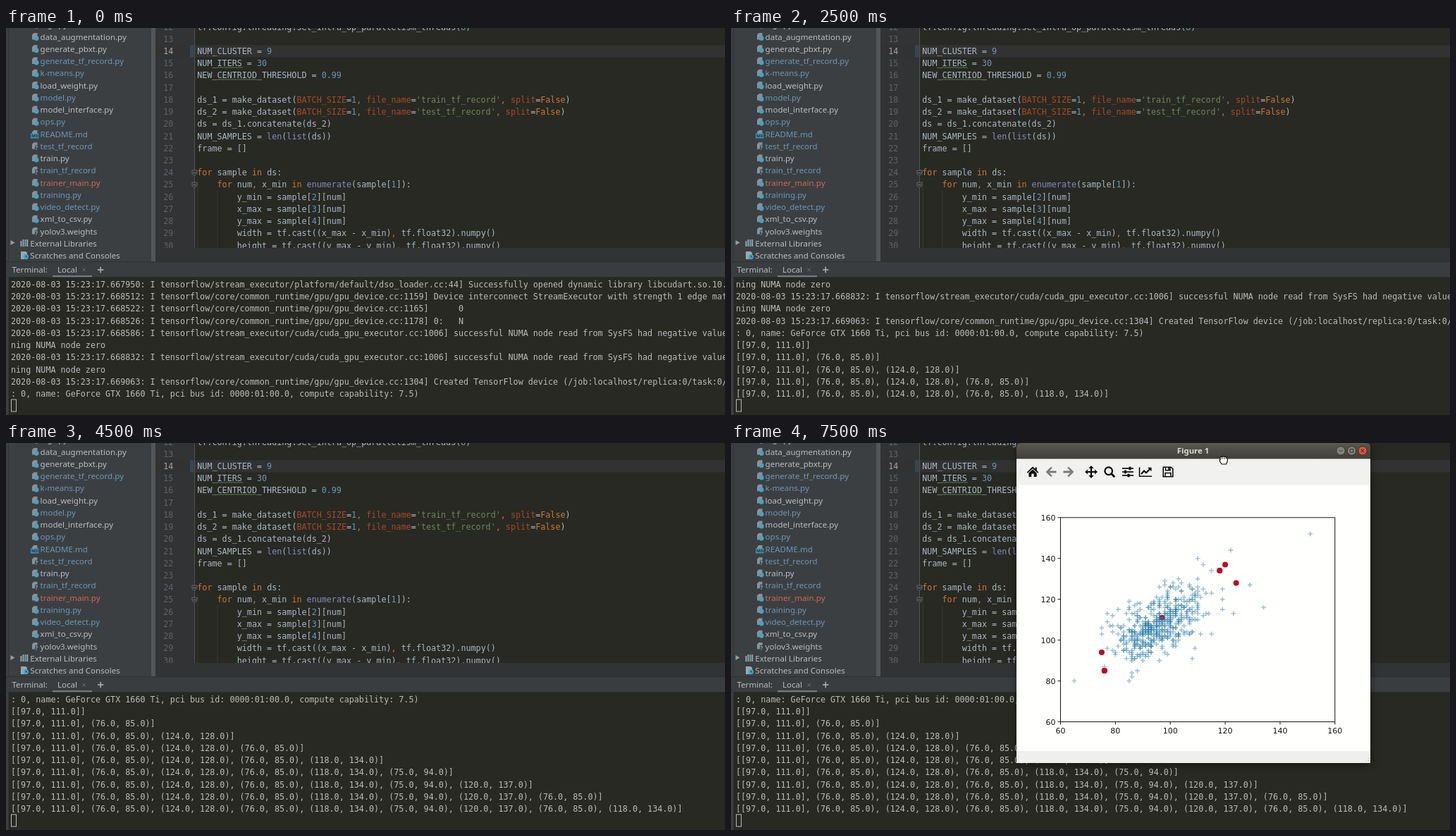
Recreate the animation shown at these times as an HTML page. Size 1020x549 px, loop 8 s.

```html
<!DOCTYPE html>
<html lang="en">
<head>
<meta charset="utf-8">
<title>Clustering run</title>
<style>
html, body { margin: 0; width: 100%; height: 100%; overflow: hidden; background: #282923; }
svg { display: block; width: 1020px; height: 549px; }
text { white-space: pre; }
.mono { font: 11.73px "DejaVu Sans Mono", monospace; }
.ui { font: 11.55px "Noto Sans", "Open Sans", sans-serif; }
.tick { font: 11px "DejaVu Sans", sans-serif; fill: #111; }
.title { font: bold 11.4px "Noto Sans", "Open Sans", sans-serif; fill: #dfdbd2; }
</style>
</head>
<body>
<svg id="stage" viewBox="0 0 1020 549" xmlns="http://www.w3.org/2000/svg">
  <defs>
    <clipPath id="editorClip"><rect x="212" y="0" width="808" height="312"/></clipPath>
    <linearGradient id="bar" x2="0" y2="1">
      <stop offset="0" stop-color="#5a584f"/><stop offset="1" stop-color="#3e3d38"/>
    </linearGradient>
    <filter id="blur" x="-10%" y="-10%" width="120%" height="120%"><feGaussianBlur stdDeviation="6"/></filter>
  </defs>
</svg>
<script>
const stage = document.getElementById('stage');
const PITCH = 17.22;

function el(parent, tag, attrs = {}, text) {
  const node = document.createElementNS('http://www.w3.org/2000/svg', tag);
  for (const key in attrs) node.setAttribute(key, attrs[key]);
  if (text !== undefined) node.textContent = text;
  parent.appendChild(node);
  return node;
}
const group = (parent, attrs) => el(parent, 'g', attrs);
const rect = (p, x, y, width, height, fill, more) => el(p, 'rect', { x, y, width, height, fill, ...more });
const path = (p, d, fill, more) => el(p, 'path', { d, fill, ...more });
const line = (p, d, stroke, w = 1, more) => path(p, d, 'none', { stroke, 'stroke-width': w, ...more });
const circle = (p, cx, cy, r, fill, more) => el(p, 'circle', { cx, cy, r, fill, ...more });
const label = (p, cls, x, y, fill, text, more) => el(p, 'text', { class: cls, x, y, fill, ...more }, text);

function drawSidebar() {
  const g = group(stage);
  rect(g, 0, 0, 212, 332, '#3c3f41');
  rect(g, 3, 0, 1, 332, '#313335');
  rect(g, 206, 0, 6, 332, '#535657');
  const tones = { n: '#bbbbbb', b: '#6897bb', r: '#d1675a' };
  const files = `n logs.py
n data_augmentation.py
n generate_pbxt.py
b generate_tf_record.py
b k-means.py
n load_weight.py
b model.py
n model_interface.py
b ops.py
b README.md
b test_tf_record
n train.py
b train_tf_record
r trainer_main.py
b training.py
b video_detect.py
n xml_to_csv.py
n yolov3.weights`.split('\n');
  files.forEach((entry, i) => {
    const name = entry.slice(2), y = -4.7 + i * 17.25;
    fileIcon(g, name, y);
    label(g, 'ui', 48.6, y + 4.1, tones[entry[0]], name);
  });

  path(g, 'M6.5 301 L12.5 304.5 L6.5 308 Z', '#9a9da0');
  [20.5, 23.5, 26.5, 29.3].forEach((x, i) =>
    rect(g, x, i ? 300 : 302, 1.9, i ? 10 : 8, i === 2 ? '#62a9bd' : '#9aa7b0'));
  label(g, 'ui', 34.3, 309.8, '#bbbbbb', 'External Libraries');
  path(g, 'M21 317 h7 l2 2 v4 h-4 v5 h-5 Z', '#9aa7b0');
  circle(g, 28.3, 324.6, 3.7, '#40a5cc');
  line(g, 'M28.3 322.5 v2.3 h1.8', '#2f3a40');
  label(g, 'ui', 34.3, 327.1, '#bbbbbb', 'Scratches and Consoles');
}

function fileIcon(g, name, y) {
  path(g, `M39.5 ${y - 5.5} h5 v9.5 h-7.5 v-7 Z`, '#87929a');
  if (name.endsWith('.py')) {
    circle(g, 43.2, y + 2, 3.4, '#4aa0c4');
  } else if (name.endsWith('.md')) {
    rect(g, 35, y - 1, 11.5, 7, '#3f91b5');
    label(g, 'ui', 36, y + 4.8, '#263238', 'MD', { style: 'font-size:6px;font-weight:bold' });
  } else {
    rect(g, 41, y - 1.5, 5.5, 7.5, '#3c3f41');
    label(g, 'ui', 41, y + 5.3, '#56b3d8', '?', { style: 'font-size:9px;font-weight:bold' });
  }
}

const KEYWORDS = /^(for|in|False)$/;
const BUILTINS = /^(len|list|enumerate)$/;
const KWARGS = /^(BATCH_SIZE|file_name|split)$/;

function tokenTone(token) {
  if (token[0] === "'") return '#6a8759';
  if (/^\d/.test(token)) return '#6897bb';
  if (token === ',' || KEYWORDS.test(token)) return '#cc7832';
  if (BUILTINS.test(token)) return '#8888c6';
  if (KWARGS.test(token)) return '#aa4926';
  return '#a9b7c6';
}

function squiggle(g, x, y, w) {
  let d = `M${x} ${y}`;
  for (let i = 0; i < w / 4; i++) d += ' l2 -2 l2 2';
  line(g, d, '#5f9465', 0.9);
}

function drawEditor() {
  const g = group(stage, { 'clip-path': 'url(#editorClip)' });
  rect(g, 212, 0, 808, 312, '#282923');
  rect(g, 212, 0, 55, 312, '#313335');
  rect(g, 212, 24.3, 808, 17.2, '#323232');
  rect(g, 261, 24.3, 5.5, 17.2, '#374752');
  line(g, 'M267.5 0 V312', '#55585a', 0.9);
  line(g, 'M272 214 V312 M300 231 V312', '#393a36');
  const code = `tf.config.threading.set_intra_op_parallelism_threads(8)

NUM_CLUSTER = 9
NUM_ITERS = 30
NEW_CENTRIOD_THRESHOLD = 0.99

ds_1 = make_dataset(BATCH_SIZE=1, file_name='train_tf_record', split=False)
ds_2 = make_dataset(BATCH_SIZE=1, file_name='test_tf_record', split=False)
ds = ds_1.concatenate(ds_2)
NUM_SAMPLES = len(list(ds))
frame = []

for sample in ds:
    for num, x_min in enumerate(sample[1]):
        y_min = sample[2][num]
        x_max = sample[3][num]
        y_max = sample[4][num]
        width = tf.cast((x_max - x_min), tf.float32).numpy()
        height = tf.cast((y_max - y_min), tf.float32).numpy()`.split('\n');
  code.forEach((src, i) => {
    const y = 2.6 + i * PITCH, no = 12 + i;
    label(g, 'mono', 237.3, y, no === 14 ? '#a4a3a3' : '#606366', no, { 'text-anchor': 'end' });
    const row = label(g, 'mono', 271.3, y, '#a9b7c6');
    for (const token of src.match(/'[^']*'|\d+(\.\d+)?|\w+|\s+|./g) || [])
      el(row, 'tspan', { fill: tokenTone(token) }, token);
  });
  squiggle(g, 299.5, 57, 35);
  squiggle(g, 299.5, 74, 56);
  for (const y of [205.5, 222.7]) {
    path(g, `M264 ${y - 3.5} h7 v4.5 l-3.5 3 l-3.5 -3 Z`, '#313335', { stroke: '#6b6e70', 'stroke-width': 0.9 });
    line(g, `M265.5 ${y} h4`, '#8a8d8f', 0.9);
  }
  rect(stage, 212, 312, 808, 20, '#313335');
}

function drawTerminalFrame() {
  const g = group(stage);
  rect(g, 0, 331, 1020, 22.5, '#3a3d3f');
  rect(g, 0, 331, 1020, 1, '#2d2f30');
  rect(g, 66, 351, 56, 2.6, '#747a80');
  label(g, 'ui', 8.5, 347, '#bbbbbb', 'Terminal:');
  label(g, 'ui', 73, 347, '#bbbbbb', 'Local');
  line(g, 'M108.3 340.8 l4.6 4.6 m0 -4.6 l-4.6 4.6', '#74777a', 0.9);
  line(g, 'M130 343 h8.4 m-4.2 -4.2 v8.4', '#b5b8ba', 1.4);
  rect(g, 0, 353.5, 1020, 196, '#282923');
  rect(g, 0, 353.5, 3.5, 196, '#3c3f41');
  rect(g, 7.5, 527, 7, 17, 'none', { stroke: '#bbbbbb' });
}

const stamp = (us, src, msg) => `2020-08-03 15:23:17.${us}: I tensorflow/${src}] ${msg}`;
const GPU = 'core/common_runtime/gpu/gpu_device.cc:';
const NUMA = 'successful NUMA node read from SysFS had negative value (-1)';
const CUDA = 'stream_executor/cuda/cuda_gpu_executor.cc:1006';
const centres = [[97, 111], [76, 85], [124, 128], [76, 85], [118, 134], [75, 94], [120, 137], [76, 85], [118, 134]];
const pairs = centres.map(c => c.map(v => v.toFixed(1)).join(', '));
const log = [
  stamp(667950, 'stream_executor/platform/default/dso_loader.cc:44', 'Successfully opened dynamic library libcudart.so.10.1'),
  stamp(668512, GPU + 1159, 'Device interconnect StreamExecutor with strength 1 edge matrix:'),
  stamp(668522, GPU + 1165, '     0'),
  stamp(668526, GPU + 1178, '0:   N'),
  stamp(668586, CUDA, NUMA),
  'ning NUMA node zero',
  stamp(668832, CUDA, NUMA),
  'ning NUMA node zero',
  stamp(669063, GPU + 1304, 'Created TensorFlow device (/job:localhost/replica:0/task:0/device'),
  ': 0, name: GeForce GTX 1660 Ti, pci bus id: 0000:01:00.0, compute capability: 7.5)',
  ...pairs.map((_, i) => '[' + pairs.slice(0, i + 1).map((p, k) => k ? `(${p})` : `[${p}]`).join(', ') + ']')
];

function random(seed) {
  return () => {
    seed = (seed + 0x6D2B79F5) | 0;
    let t = Math.imul(seed ^ (seed >>> 15), 1 | seed);
    t = (t + Math.imul(t ^ (t >>> 7), 61 | t)) ^ t;
    return ((t ^ (t >>> 14)) >>> 0) / 4294967296;
  };
}

function samples() {
  const rnd = random(11);
  const gauss = () => Math.sqrt(-2 * Math.log(1 - rnd())) * Math.cos(2 * Math.PI * rnd());
  const points = [
    [151, 152], [122, 144], [110, 140], [112, 137], [115, 134], [103, 130], [110, 130], [98, 129],
    [119, 125], [129, 127], [134, 116], [123, 113], [119, 120], [119, 115], [115, 123], [115, 103],
    [109, 96], [85, 119], [85, 80], [86, 82], [86, 84], [88, 85], [75, 106], [75, 103], [76, 87], [65, 80]
  ];
  while (points.length < 490) {
    const x = Math.round(95.5 + 8.3 * gauss());
    const y = Math.round(107.5 + 0.7 * (x - 95.5) + 7.8 * gauss());
    if (x > 76 && x < 115 && y > 89 && y < 129) points.push([x, y]);
  }
  return points;
}

// Window coordinates: origin at its top left corner.
function drawFigure() {
  const g = group(stage);
  rect(g, 0, 4, 502, 452, '#000', { opacity: 0.5, filter: 'url(#blur)' });
  path(g, 'M0 24 V6 Q0 0 6 0 H496 Q502 0 502 6 V24 Z', 'url(#bar)');
  label(g, 'title', 250.5, 15.2, '#dfdbd2', 'Figure 1', { 'text-anchor': 'middle' });
  circle(g, 460, 11, 6.2, '#85837a', { stroke: '#33322e' });
  circle(g, 475.5, 11, 6.2, '#85837a', { stroke: '#33322e' });
  circle(g, 491, 11, 6.2, '#e5552d', { stroke: '#33322e' });
  line(g, 'M457.5 11 h5 M473.2 8.8 h4.6 v4.4 h-4.6 Z M488.9 8.9 l4.2 4.2 m0 -4.2 l-4.2 4.2', '#35332e', 1.1);

  rect(g, 0, 22.5, 502, 37.5, '#f1f1f0');
  rect(g, 0, 59.5, 502, 377.5, '#fffffd');
  rect(g, 0, 437, 502, 17, '#efefed');
  line(g, 'M5.5 36 v12', '#b9b9b7', 1, { 'stroke-dasharray': '1 2' });
  line(g, 'M496 450.5 h1 m2 0 h1 m-1 -3 h1', '#b0b0ae');
  drawTools(g);
  drawPlot(g);
  return g;
}

function drawTools(g) {
  const at = x => group(g, { transform: `translate(${x} 41)` });
  path(at(23), 'M0 -7.5 L3.5 -4.2 V-6.5 H5.8 V-2 L8.3 .6 L7.3 1.7 L0 -4.8 L-7.3 1.7 L-8.3 .6 Z M-5.6 1.6 L0 -3.4 L5.6 1.6 V7 H1.7 V2.6 H-1.7 V7 H-5.6 Z', '#0c0c0c');
  const arrow = 'M-7.5 0 L0 -7.3 L1.8 -5.5 L-2.3 -1.4 H7.5 V1.4 H-2.3 L1.8 5.5 L0 7.3 Z';
  path(at(49), arrow, '#7b7b7b');
  path(group(at(74), { transform: 'scale(-1 1)' }), arrow, '#7b7b7b');
  const move = at(106);
  line(move, 'M-7 0 H7 M0 -7 V7', '#0c0c0c', 2.2);
  for (const a of [0, 90, 180, 270])
    path(move, 'M0 -9 L3.6 -5 H-3.6 Z', '#0c0c0c', { transform: `rotate(${a})` });
  const zoom = at(132);
  circle(zoom, -1.3, -1.3, 5.3, 'none', { stroke: '#0c0c0c', 'stroke-width': 2.3 });
  line(zoom, 'M2.8 2.8 L7.2 7.2', '#0c0c0c', 3);
  const sliders = at(158);
  [[-5, 3], [0, -3.5], [5, 1]].forEach(([y, x]) => {
    line(sliders, `M-8 ${y} H8`, '#0c0c0c', 1.7);
    rect(sliders, x - 1.5, y - 2.3, 3, 4.6, '#0c0c0c');
  });
  const chart = at(183);
  line(chart, 'M-8.5 -6.5 V6.2 H9', '#0c0c0c', 1.6);
  line(chart, 'M-6 3 L-2 -1.5 L1 1.3 L6.5 -4.2', '#0c0c0c', 2.2);
  path(chart, 'M3 -6.2 H8.5 V-.7 Z', '#0c0c0c');
  const save = at(215);
  line(save, 'M-6.8 -6.8 H4.2 L6.8 -4.2 V6.8 H-6.8 Z', '#0c0c0c', 1.6);
  line(save, 'M-3.5 -6.5 V-2.2 H3 V-6.5 M-4 6.5 V1.6 H4 V6.5', '#0c0c0c', 1.5);
  rect(save, 0.3, -6, 1.8, 3, '#0c0c0c');
}

function drawPlot(g) {
  const px = v => 62.5 + (v - 60) * 3.893;
  const py = v => 395.5 - (v - 60) * 2.897;
  for (const [x, y] of centres) circle(g, px(x), py(y), 4, '#bd0a22');
  const marks = group(g, { stroke: '#2b7ca8', 'stroke-opacity': 0.45, 'stroke-width': 1.6 });
  for (const [x, y] of samples())
    path(marks, `M${px(x) - 3.3} ${py(y)} h6.6 m-3.3 -3.3 v6.6`, 'none');
  rect(g, 62.5, py(160), 389.3, 289.7, 'none', { stroke: '#151515' });
  for (let v = 60; v <= 160; v += 20) {
    line(g, `M${px(v)} 395.5 v4 M62.5 ${py(v)} h-4`, '#151515');
    label(g, 'tick', px(v), 412, '#111', v, { 'text-anchor': 'middle' });
    label(g, 'tick', 55.5, py(v) + 4.2, '#111', v, { 'text-anchor': 'end' });
  }
}

function drawHand() {
  const g = group(stage, { transform: 'translate(699 25)' });
  path(g, 'M-5 -4 Q-4 -6.5 -2.3 -5 Q-1 -7 .6 -5.2 Q2.2 -6.5 3.3 -4.5 Q5.6 -4.8 5.4 -2 L5 1.5 L3.6 5 H-3 L-5.4 1 Q-6.6 -1.5 -4.8 -1.3 Z',
    '#fff', { stroke: '#111', 'stroke-width': 1.2 });
  line(g, 'M-2.3 -4.5 V-2 M.6 -4.5 V-2 M3.2 -4 V-2', '#111', 0.9);
  return g;
}

drawSidebar();
drawEditor();
drawTerminalFrame();
const rows = Array.from({ length: 10 }, (_, i) => label(stage, 'mono', 7, 368 + i * PITCH, '#bbbbbb', ''));
const figure = drawFigure();
const hand = drawHand();

const LOOP = 8000;
const drag = [[954, -53], [671, 10.2], [405, 0]];
let shown = -1;

function render(t) {
  const step = Math.floor((t + 500) / 1000);
  if (step === shown) return;
  shown = step;
  const scroll = step ? Math.min(9, 2 * step - 1) : 0;
  rows.forEach((row, i) => { row.textContent = log[i + scroll]; });
  const spot = drag[step - 6];
  figure.setAttribute('visibility', spot ? 'visible' : 'hidden');
  if (spot) figure.setAttribute('transform', `translate(${spot})`);
  hand.setAttribute('visibility', step === 8 ? 'visible' : 'hidden');
}

const start = performance.now();
function tick() {
  render((performance.now() - start) % LOOP);
  requestAnimationFrame(tick);
}
tick();
</script>
</body>
</html>
```
